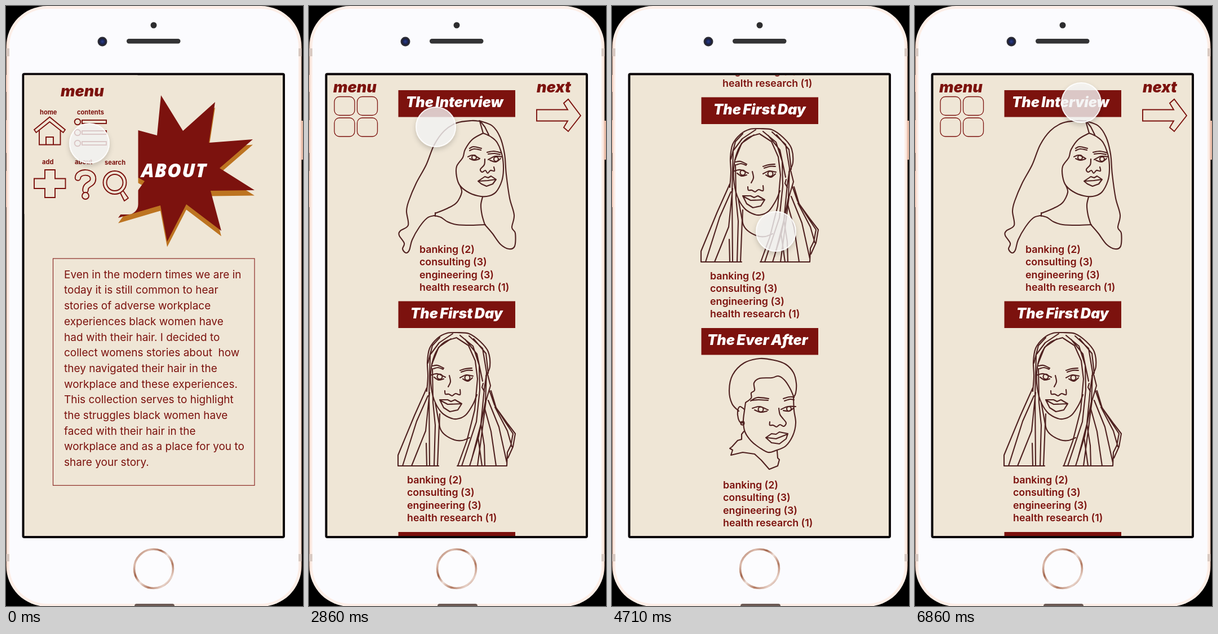
These frames come from a looping animation (527 px wide and 1062 px high, 7010 ms). An HTML page:

```html
<!DOCTYPE html>
<html lang="en">
<head>
<meta charset="utf-8">
<title>Phone prototype</title>
<style>
  html, body { margin: 0; width: 100%; height: 100%; overflow: hidden; background: #000; }
  svg { display: block; width: 100%; height: 100%; }
  text { font-family: Inter, "Open Sans", sans-serif; fill: #7c120e; white-space: pre; }
  .title { font-weight: 900; font-style: italic; font-size: 27px; }
  .banner { font-weight: 900; font-style: italic; font-size: 25.2px; fill: #fff; word-spacing: -1.5px; }
  .about { font: italic 800 33.5px "Open Sans", Inter, sans-serif; fill: #fff; letter-spacing: 1.2px; }
  .label { font-weight: 700; font-size: 11.1px; }
  .body { font-size: 19px; }
  .list { font-weight: 600; font-size: 17.8px; }
  .red { fill: #7c120e; }
  .paper { fill: #efe6d6; }
  .icon { fill: none; stroke: #7c120e; stroke-width: 1.9; }
  .thin { stroke-width: 1.3; }
  .art { fill: none; stroke: #4f2120; stroke-width: 2.1; stroke-linecap: round; stroke-linejoin: round; }
</style>
</head>
<body>
<svg viewBox="0 0 527 1062" preserveAspectRatio="none">
  <defs>
    <clipPath id="screen"><rect x="32.5" y="122.5" width="458.5" height="815.5"/></clipPath>
    <linearGradient id="copper" x1="0" y1="0" x2="1" y2="1">
      <stop offset="0" stop-color="#a56a52"/><stop offset=".2" stop-color="#dcbcae"/>
      <stop offset=".36" stop-color="#a3664d"/><stop offset=".5" stop-color="#efe0d9"/>
      <stop offset=".68" stop-color="#b27a62"/><stop offset=".84" stop-color="#e8d2c8"/>
      <stop offset="1" stop-color="#96593f"/>
    </linearGradient>
    <linearGradient id="rim">
      <stop offset="0" stop-color="#f0c9b8"/><stop offset=".006" stop-color="#fdeee7"/>
      <stop offset=".994" stop-color="#fdeee7"/><stop offset="1" stop-color="#f0c9b8"/>
    </linearGradient>
    <radialGradient id="lens">
      <stop offset="0" stop-color="#2b3f8c"/><stop offset=".45" stop-color="#1b2558"/>
      <stop offset=".7" stop-color="#23232f"/><stop offset="1" stop-color="#383840"/>
    </radialGradient>
    <filter id="shade" x="-50%" y="-50%" width="200%" height="200%">
      <feDropShadow dx="0" dy="4" stdDeviation="4" flood-color="#000" flood-opacity=".22"/>
    </filter>
    <path id="star" d="M275 158 314 221 371 170 360 242 438 236 379 287 441 326 363 327 382 398 320 351 286 417 274 353 199 375 246 310 190 280 234 256 205 212 268 229Z"/>
    <path id="hook" d="M127.500 304C128 292 154.500 291 154.500 306 154.500 317 141 314 141 326"/>
  </defs>

  <!-- phone -->
  <rect width="527" height="1062"/>
  <path fill="#e5b8a4" d="M522 203h5v69h-5zM0 122h3v30H0zM0 202h3v58H0zM0 292h3v64H0z"/>
  <rect x=".5" width="524" height="1063" rx="72" fill="url(#rim)"/>
  <path fill="#d9c9c1" d="M.5 75h6v14h-6zM518.500 75h6v14h-6zM.5 970h6v13h-6zM518.500 970h6v13h-6z"/>
  <rect x="6" y="5" width="513" height="1053" rx="67" fill="#fbfbfe"/>
  <rect x="228" y="1058" width="71" height="8" rx="4" fill="#6c5a54"/>
  <circle cx="262" cy="34" r="5.500" fill="#2d2d2f"/>
  <circle cx="171" cy="63" r="8.500" fill="url(#lens)"/>
  <rect x="214" y="58" width="95.500" height="8.500" rx="4.200" fill="#333335"/>
  <circle cx="262" cy="996" r="34.500" fill="#fcfcfe" stroke="url(#copper)" stroke-width="3.600"/>
  <rect x="28.500" y="118.500" width="466.500" height="823.500" rx="4" fill="#090407"/>

  <g clip-path="url(#screen)">
    <rect class="paper" x="32" y="122" width="460" height="817"/>

    <g id="aboutPage">
      <use href="#star" y="9.500" fill="#bd7421"/>
      <use href="#star" class="red"/>
      <rect class="paper" x="20" y="110" width="214.500" height="259" rx="18"/>
      <text class="about" x="240" y="302.500">ABOUT</text>
      <text class="title" x="97" y="160">menu</text>
      <text class="label" x="60" y="192">home</text>
      <text class="label" x="126" y="192">contents</text>
      <text class="label" x="64" y="280">add</text>
      <text class="label" x="122" y="280">about</text>
      <text class="label" x="175" y="281">search</text>
      <g class="icon">
        <path d="M50 219 77.500 196.500 105 219 101.500 224 77.500 205 53.500 224ZM59 220V245.500H96.500V220M71 245V232H84V245"/>
        <g id="rows"></g>
        <path d="M69 290H87V305.500H105.500V323H87V339H69V323H50V305.500H69Z"/>
        <g stroke-linecap="round">
          <use href="#hook" style="stroke-width:11.500"/>
          <use href="#hook" style="stroke:#efe6d6;stroke-width:7.700"/>
        </g>
        <circle class="paper" cx="141" cy="336" r="6"/>
        <path class="paper" d="M201 327 210 345 217 340 205 323Z" stroke-linejoin="round"/>
        <circle class="paper" cx="193" cy="312.500" r="20.500"/>
        <circle cx="193" cy="312.500" r="14.500"/>
      </g>
      <rect x="83.500" y="447" width="357.500" height="401.500" fill="none" stroke="#8b2a26" stroke-width="1.200"/>
      <g id="story"></g>
    </g>

    <g id="listPage">
      <text class="title" x="43" y="153">menu</text>
      <text class="title" x="404" y="153">next</text>
      <g id="tiles"></g>
      <path class="icon" d="M404 183.500H459L452 172 460 165 482 194 460 222 452 215 459 203.500H404Z"/>
      <g id="sections"></g>

      <!-- long hair -->
      <g class="art">
        <path class="soft" d="M304 204 288 203 262 207 240 221 222 246 208 281 190 314 177 345 173 363 176 388 162 398 160 406 169 420 166 430 172 437 178 432 183 414 196 391 210 375 222 371"/>
        <path class="soft" d="M302 203 325 212 339 232 347 262 350 298 356 340 364 370 360 392 366 402 365 425 355 430 340 422 325 402 312 387"/>
        <path class="soft" d="M309 225 290 236 277 254 273 268 262 284 262 302 268 318 285 331 305 337 320 336 332 329 342 310 345 290 343 266 334 242 322 231 309 225"/>
        <path d="M303 204 309 225M304 204 312 214 319 228M224 366V372"/>
        <path class="soft" d="M268 318 271 330 262 348 246 358 224 367"/>
        <path class="soft" d="M222 371 234 374 246 382 262 387 288 388 313 387"/>
        <path class="soft" d="M308 338 305 352 307 370 312 387"/>
      </g>
      <g class="art">
        <path class="soft" d="M285 252 292 249 306 252M285 256 293 253 305 255M316 259 328 257 341 260M318 262 329 261 339 263"/>
        <path class="soft" d="M282 267 291 264 303 270M285 270 293 273 302 271M318 272 330 266 342 267M321 273 331 276 340 270"/>
        <circle cx="293" cy="268" r="4"/><circle cx="332" cy="271" r="4"/>
        <path class="soft" d="M312 271 311 281 304 289 307 294 313 291 317 296 322 291 329 292 328 285"/>
        <path d="M300 310 312 302 318 304 323 301 332 307 326 315 315 319 306 315ZM301 310 317 309 331 307"/>
      </g>

      <!-- braids -->
      <g class="art">
        <path class="soft" d="M263 578 245 579 228 588 214 606 210 630 211 655 209 682"/>
        <path d="M209 676 187 725 158 795V814H230M211 690 191 735 166 814M214 684 207 752 182 814M208 774 209 814M215 616 213 690 214 814M219 642 220 702 224 742 222 814M224 702 231 740 228 814"/>
        <path class="soft" d="M262 587 240 595 225 613 217 640 216 668 222 697 234 718 248 728 262 731 278 724 291 705 298 688"/>
        <path d="M255 580 231 596 216 616M252 589 230 604 218 634M232 587 219 601 211 632"/>
        <path class="soft" d="M232 722 232 745 240 758 258 768 272 769 285 764"/>
      </g>
      <g class="art">
        <path class="soft" d="M263 578 284 580 304 594 318 612 321 638 314 655"/>
        <path d="M263 588 283 601 295 628 299 660 294 715 280 770 264 814M268 583 291 602 302 636 303 680 297 736 271 814M284 584 308 606 315 648 313 700 301 762 285 814M292 589 314 615 318 650M277 590 298 616 308 664M315 651 311 678 305 740 288 805M317 652 322 672 314 699 308 746 299 814"/>
        <path d="M320 680 329 706 348 736 362 757 358 778 352 790 351 814H263M323 681 332 711 353 740 366 757 362 780 353 800M312 713 323 753 332 814M305 740 311 778 312 814M318 698 337 745 351 808M330 710 352 752 360 780M300 764 307 814"/>
        <path d="M309 668 307 675 311 682"/>
      </g>
      <g class="art">
        <path class="soft" d="M219 637 228 636 239 641M221 642 229 640 238 643M268 645 278 642 289 641M270 648 280 645 290 645"/>
        <path class="soft" d="M217 653 228 651 242 657M222 657 230 662 239 660M268 658 279 653 291 655M273 660 282 664 290 658"/>
        <circle cx="232" cy="656" r="4.500"/><circle cx="281" cy="658" r="4.500"/>
        <path class="soft" d="M249 654 251 665 247 674"/>
        <path class="soft" d="M241 681 242 687 248 687 254 690 260 686 268 688 268 679"/>
        <path d="M232 697 246 697 252 700 259 697 271 704 264 715 250 718 239 711ZM233 698 246 705 271 704"/>
      </g>

      <!-- short hair -->
      <g class="art" transform="translate(0 361)">
        <path class="soft" d="M225 717 213 704 208 680 214 653 234 632 262 624 288 627 308 634 322 649 327 668 326 685 322 693"/>
        <path class="soft" d="M237 702 247 694 247 685 253 680 252 667 262 659 284 658 295 655 306 662 316 677 323 693"/>
        <path class="soft" d="M237 702 235 716 233 735 236 754 247 770 262 782 277 790 290 787 308 779 321 760 326 738 323 716 322 693"/>
        <path class="soft" d="M235 714 227 709 223 717 224 730 229 738 234 736"/>
        <circle cx="231.500" cy="738.500" r="3"/>
        <path d="M234 753 230 758 230 767 223 769 213 780 209 783 214 786 211 795 232 790 253 793 265 804 279 820 294 814 297 803 294 800 293 787"/>
      </g>
      <g class="art" transform="translate(0 361)">
        <path class="soft" d="M246 699 258 693 278 695M249 698 260 697 277 698M304 695 314 692 323 692M306 699 316 696 323 697"/>
        <path class="soft" d="M249 712 262 709 277 715M253 715 264 719 275 717M300 714 312 709 326 709M304 716 314 717 322 712"/>
        <circle cx="264" cy="714" r="4.500"/><circle cx="314" cy="713" r="4"/>
        <path class="soft" d="M296 712 298 723 304 731 309 738 305 744 298 741 292 745 286 742 280 742 280 736"/>
        <path d="M273 764 283 757 291 758 297 754 312 757 309 766 297 775 283 773ZM275 764 291 766 311 758"/>
      </g>
    </g>
    <g id="touch">
      <circle r="35" fill="#f8f8f8" fill-opacity=".77" stroke="#fff" stroke-opacity=".9" stroke-width="1.800" filter="url(#shade)"/>
    </g>
  </g>
</svg>

<script>
const $ = id => document.getElementById(id);
const line = (cls, x, y, s) => `<text class="${cls}" x="${x}" y="${y}">${s}</text>`;

$('rows').innerHTML = [205, 224, 243].map(y =>
  `<circle cx="127" cy="${y}" r="5.3"/><rect x="135" y="${y - 3}" width="43" height="6"/>`).join('');

$('tiles').innerHTML = [0, 1, 2, 3].map(i =>
  `<rect class="icon thin" x="${45 + i % 2 * 40.5}" y="${160.5 + (i >> 1) * 37.5}" width="36" height="33" rx="9"/>`).join('');

const story = [
  'Even in the modern times we are in', 'today it is still common to hear',
  'stories of adverse workplace', 'experiences black women have',
  'had with their hair. I decided to', 'collect womens stories about  how',
  'they navigated their hair in the', 'workplace and these experiences.',
  'This collection serves to highlight', 'the struggles black women have',
  'faced with their hair in the', 'workplace and as a place for you to',
  'share your story.'
];
$('story').innerHTML = story.map((s, i) => line('body', 103, 481.7 + i * 27.7, s)).join('');

const jobs = ['banking (2)', 'consulting (3)', 'engineering (3)', 'health research (1)'];
const section = (name, nameX, top, listX, listY) =>
  `<rect class="red" x="158.5" y="${top}" width="207.5" height="47.5"/>` +
  line('banner', nameX, top + 30, name) +
  jobs.map((s, i) => line('list', listX, listY + i * 22.4, s)).join('');
$('sections').innerHTML =
  section('The Interview', 172, 149, 196, 437) +
  section('The First Day', 180, 522.5, 174, 845) +
  section('The Ever After', 169, 931, 197, 1215);

// Catmull-Rom curve through each run of points
function smooth(d) {
  return d.split('M').slice(1).map(run => {
    const n = run.trim().split(/\s+/).map(Number), p = [];
    for (let i = 0; i < n.length; i += 2) p.push([n[i], n[i + 1]]);
    const at = i => p[Math.max(0, Math.min(p.length - 1, i))];
    let out = 'M' + p[0];
    for (let i = 0; i < p.length - 1; i++) {
      const [a, b, c, e] = [at(i - 1), at(i), at(i + 1), at(i + 2)];
      out += 'C' + [0, 1].map(k => b[k] + (c[k] - a[k]) / 6) +
        ' ' + [0, 1].map(k => c[k] - (e[k] - b[k]) / 6) + ' ' + c;
    }
    return out;
  }).join('');
}
document.querySelectorAll('.soft').forEach(p => p.setAttribute('d', smooth(p.getAttribute('d'))));

// Keys are [ms, values...]
const touchKeys = [
  [0, 148, 243], [1430, 145, 227], [2000, 145, 227], [2860, 225, 214],
  [3430, 292, 403], [3860, 292, 403], [4710, 291, 399], [5290, 282, 354],
  [5570, 282, 354], [6860, 295, 171]
];
const scrollKeys = [[3290, 0], [3860, 268.5], [4290, 361], [4710, 361], [5290, 0]];

function sample(keys, t) {
  const i = keys.findIndex(k => k[0] > t);
  if (i === 0) return keys[0].slice(1);
  if (i < 0) return keys[keys.length - 1].slice(1);
  const a = keys[i - 1], b = keys[i], u = (t - a[0]) / (b[0] - a[0]);
  return a.slice(1).map((v, k) => v + (b[k + 1] - v) * u);
}

const LOOP = 7010, STEPS = 49, SWITCH = 1705;

// Motion advances seven times a second
function draw(now) {
  const step = Math.min(STEPS - 1, Math.floor(now % LOOP * 7 / 1000 + .2));
  const t = Math.round(step * 100 / 7) * 10;
  const listed = t > SWITCH;
  $('aboutPage').style.display = listed ? 'none' : '';
  $('listPage').style.display = listed ? '' : 'none';
  $('listPage').setAttribute('transform', `translate(0 ${-sample(scrollKeys, t)[0]})`);
  $('touch').setAttribute('transform', `translate(${sample(touchKeys, t).join(' ')})`);
}

let start;
function tick(now) {
  start ??= now;
  draw(now - start);
  requestAnimationFrame(tick);
}
draw(0);
requestAnimationFrame(tick);
</script>
</body>
</html>
```
